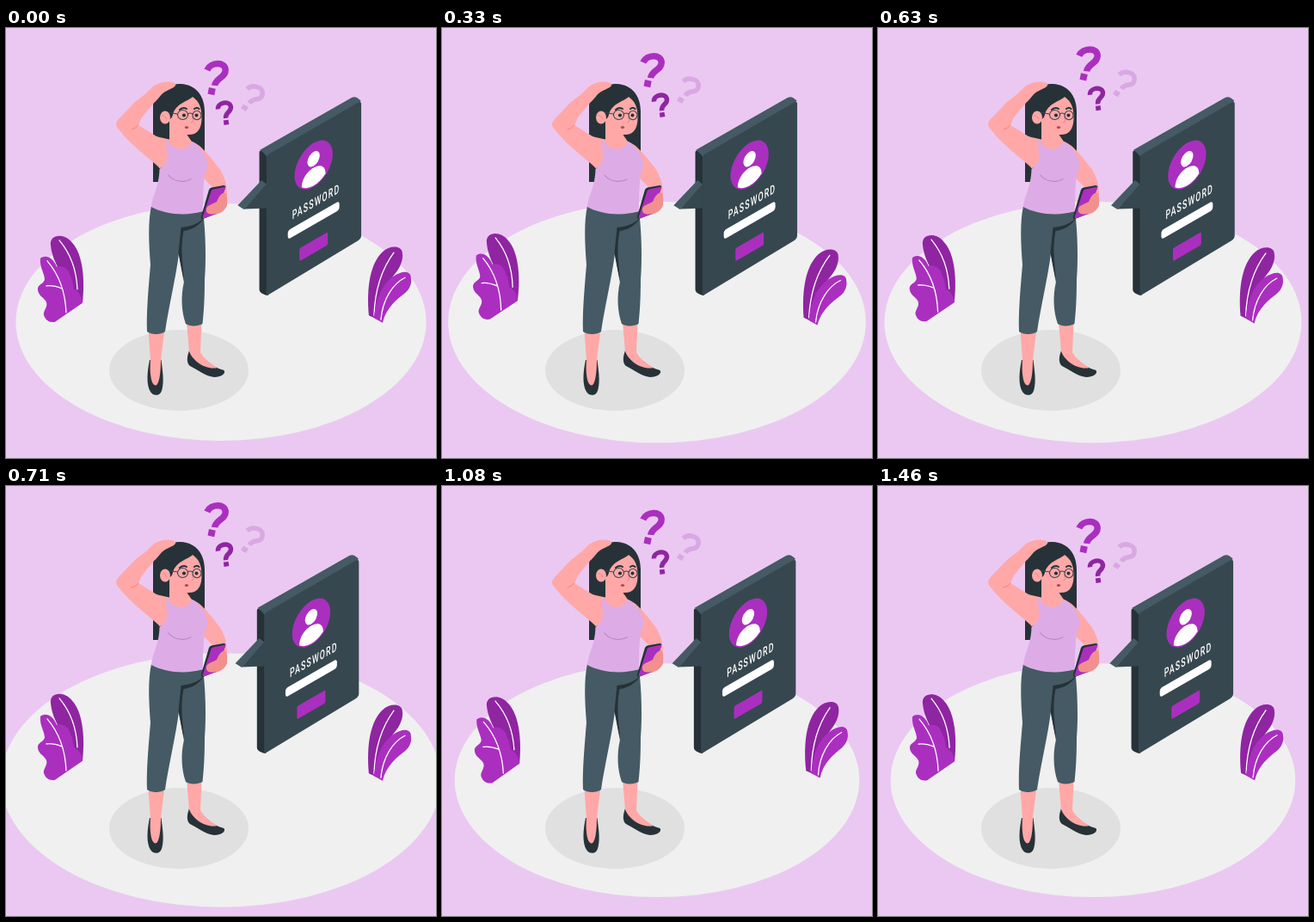
Recreate the animation shown at these times as an HTML page. Size 500 by 500 pixels, loop 1500 ms.

```html
<!DOCTYPE html>
<html lang="en">
<head>
<meta charset="utf-8">
<title>Forgot password</title>
<style>
  html, body { margin: 0; width: 100%; height: 100%; overflow: hidden; background: #ebc8f2; }
  svg { display: block; width: 100vw; height: 100vh; }
  .skin { fill: #ffa8a7; }
  .shade { fill: #f28f8f; }
  .ink { fill: #263238; }
  .slate { fill: #37474f; }
  .steel { fill: #455a64; }
  .purple { fill: #aa2fbf; }
  .plum { fill: #8f25a1; }
  .top { fill: #ddace6; }
  .white { fill: #fff; }
  .line { fill: none; stroke: #37474f; stroke-width: 1.1; stroke-linecap: round; }
  .vein { fill: none; stroke: #fff; stroke-width: 1.3; stroke-linecap: round; }
  .crease { fill: none; stroke: #ef8585; stroke-width: 1; stroke-linecap: round; }
  .hook { fill: none; }
  text { font: 500 14.5px Roboto, "Open Sans", sans-serif; letter-spacing: 1.8px; fill: #fff; }
</style>
</head>
<body>
<svg viewBox="0 0 500 500">
  <ellipse id="floor" cx="250" cy="342" rx="235.3" ry="136" fill="#f0f0f0"/>
  <ellipse cx="201" cy="398" rx="81" ry="47" fill="#e0e0e0"/>

  <g id="plants">
    <path class="plum" d="M52 253C50 240 68 238 77 250C90 264 92 295 89 320L74 312C70 290 54 275 52 253Z"/>
    <path class="vein" d="M62 247C73 260 82 280 83 304"/>
    <path class="purple" d="M40 268C46 263 55 267 59 278C66 276 73 280 75 289C78 294 78 299 79 304C85 307 88 312 89 320L57 342C50 343 46 340 44 334C43 329 49 325 47 319C44 313 38 312 37 305C36 298 45 298 45 292C44 284 39 278 40 268Z"/>
    <path class="vein" d="M48 271C60 285 69 305 70 331M47 300C54 299 60 301 65 303"/>

    <path class="plum" d="M461 262C461 252 446 252 438 260C424 273 419 300 422 334L433 339C436 310 444 296 452 286C458 279 462 270 461 262Z"/>
    <path class="vein" d="M451 261C437 280 429 305 428 334"/>
    <path class="purple" d="M471 291C471 281 460 282 450 289C438 297 430 315 428 337L438 342.500C442 325 455 315 464 308C470 303 472 296 471 291Z"/>
    <path class="vein" d="M464 290C450 297 438 315 436 339"/>
  </g>

  <g id="panel">
    <path class="ink" d="M294.700 145Q294.700 141.500 298 143L305 148V311Q302 311 298.500 309Q294.700 307 294.700 304Z"/>
    <path class="steel" d="M295.500 141.800L402 81Q405.500 79.500 409 81.500L412.800 84.500L408 91L304 151Q303 148 295.500 141.800Z"/>
    <path class="slate" d="M303 152Q303 148.500 306 146.500L409 87Q413.200 84.500 413.200 88V241Q413.200 245 409.500 247.200L306 309.700Q303 311.400 303 308Z"/>
    <path class="slate" d="M277 210.500L302 181L304 182V209.500Z"/>
    <path class="steel" d="M269.500 206.300L297.300 177L303 181.500L277 211Z"/>
    <g transform="matrix(.866 -.5 0 1 357.800 159.200)">
      <circle class="purple" r="25.600"/>
      <circle class="white" cy="-7" r="8.300"/>
      <path class="white" d="M-16 18C-16 -1.500 16 -1.500 16 18A24 24 0 0 1 -16 18Z"/>
      <rect x="-34.600" y="59" width="69.200" height="10.500" rx="3.500" fill="#fff"/>
      <rect class="purple" x="-19" y="87.500" width="38" height="15" rx="2"/>
    </g>
    <text transform="matrix(.61 -.352 0 1 333 222.700)">PASSWORD</text>
  </g>

  <g id="woman">
    <path class="ink" d="M171 92C171 75 187 65 203 65C222 66 231 80 231 97V158H181V179H171Z"/>

    <!-- feet -->
    <path class="ink" d="M167 386C164 400 163 415 168 423C172 429 180 428 181.500 420C184 410 182 398 180.500 386Z"/>
    <path class="skin" d="M165.500 352L168 386C167 398 168 414 173.500 415.500C178 416 180 402 180 386L184.500 350Z"/>
    <path class="ink" d="M213 375C210 383 210 390 214 393C224 398 232 405 242 406C250 406 256 402 253.500 398C245 396 238 391 230 384Z"/>
    <path class="skin" d="M210 342L213 376C217 387 232 398 246 395C239 391 231 386 226 377L227.500 342Z"/>

    <!-- trousers -->
    <path class="steel" d="M169 207C186 216 212 217 229 213C232 235 233 270 231 292C231 315 230 330 228.500 344C223 347 214 347.500 209 344C204 330 203 312 207 295L201 262C198 288 189 325 185 353C180 357 169 357 164 353C163 330 166 300 168 275C166 250 165 225 169 207Z"/>
    <path class="ink" d="M203.500 232L200.500 262L207 296C206 275 202 258 206.500 236C216 235 226 229 230 221C222 229 212 231 203.500 232Z"/>

    <!-- lowered arm and phone -->
    <path class="skin" d="M210 131C224 131 235 147 247 162C255 173 258 183 257 206C254 214 246 218 238 217L236 210C240 198 241 192 241 186C235 180 231 176 228 172Z"/>
    <path class="ink" d="M236 188Q237 186 239 185.500L253 183Q256 183 255 186L244 216L229 222Q226 222 227 219Z"/>
    <path class="purple" d="M238.500 189.500Q239 188 241 187.500L255.500 184.500L245 216L230 221.500Q228 221 229 219Z"/>
    <path class="shade" d="M233 212C232 206 240 205 245 202C248 194 253 190 256 192Q258 199 257 206C254 214 245 218 236 216Q233 215 233 212Z"/>

    <!-- neck and top -->
    <path class="skin" d="M190 108H209V122L216 132L210 146H190L183 134L190 130Z"/>
    <path class="skin" d="M192 130L174 126L178 163L190 158Z"/>
    <path class="top" d="M182 133L188 130.500C193 143 211 145 216 132C222 135 229 142 232 150C236 158 234 165 231 170C229 185 229 200 229 213C210 219 185 217 169 208C170 195 178 185 178.500 164C183 160 188 156 187 149C186 143 183 140 182 133Z"/>
    <path d="M189 171C195 179 207 180 215 176" fill="none" stroke="#b987c6" stroke-width="1.200" stroke-linecap="round"/>

    <!-- head -->
    <path class="skin" d="M189 98C190 82 204 76 216 79C225 84 228 94 227.500 106C227 118 222 124 213 124C204 125 195 120 190 111Z"/>
    <path class="ink" d="M187 101C183 85 190 70 205 69C221 70 230 83 230 98L228 98C227 91 224 85 217 80C212 85 199 87 194.500 99Q193 106 190 106Z"/>
    <ellipse class="skin" cx="185" cy="104" rx="6" ry="7.500"/>
    <path class="crease" d="M182 102Q185 101 187 106M216.500 104Q220 109 215.500 110"/>
    <path class="line" style="stroke:#263238;stroke-width:2" d="M202 95Q206 91.500 210 94M219 94Q222 91.500 224.500 94"/>
    <g class="line">
      <ellipse cx="205.500" cy="101" rx="6" ry="5.500"/>
      <ellipse cx="222" cy="101.500" rx="5" ry="5.200"/>
      <path d="M211.500 100Q214 98 217 100M199.500 100L190 98.500"/>
    </g>
    <circle class="ink" cx="207" cy="101.500" r="2.100"/>
    <circle class="ink" cx="221.500" cy="101.500" r="2"/>
    <ellipse cx="210" cy="115.500" rx="2.200" ry="1.500" fill="#b24a52"/>

    <!-- raised arm -->
    <path class="skin" d="M128 112Q128 109 131 106L150 86L163 76L171 68C178 63 188 61 196 64Q199 66 195 69L185 74C180 77 178 82 172 87L158 104L154 113L175 126L186 131L187 150C186 157 183 161 179 163C165 150 145 136 132 119Q128 115 128 112Z"/>
    <path class="crease" d="M154 113Q151 117 146 118"/>
  </g>

  <g id="marks">
    <g stroke="#aa2fbf" fill="#aa2fbf">
      <path class="hook" stroke-width="7.500" d="M233.800 49C238 39.500 255 38.800 255.200 49C255.500 57.500 243.500 58.500 242.700 67"/>
      <path stroke="none" d="M236 69L243.800 70.700L242.200 78.200L234.500 76.500Z"/>
    </g>
    <g stroke="#8f25a1" fill="#8f25a1">
      <path class="hook" stroke-width="5.400" d="M246.500 94.500C245.500 86.500 260 84 261.500 91.500C262.500 98 254.500 97.500 255.600 105"/>
      <path stroke="none" d="M252.800 107.600L258.500 106.800L259.400 112L253.600 113Z"/>
    </g>
    <g stroke="#d9a8e3" fill="#d9a8e3">
      <path class="hook" stroke-width="5.600" d="M280.500 71C286 65.500 300 68 298 77.500C296 86 288 79.500 283 87.500"/>
      <path stroke="none" d="M276 88.500L282 92L279 97L273 93.500Z"/>
    </g>
  </g>
</svg>
<script>
  const LOOP = 1500, STEPS = 36;

  // Each track is a list of [progress, value], joined linearly.
  const tracks = {
    pulse: [[0, 1], [.1, 1.1], [.3, 1], [.4, 1], [.5, 1.1], [.6, 1], [1, 1]],
    lift: [[0, .5], [.5, -19.5], [1, .5]],
    sway: [[0, 0], [.25, 1], [.75, -1], [1, 0]],
    shake: [[0, 0], [.1, -1], [.2, 2], [.3, -4], [.4, 4], [.5, -4],
            [.6, 4], [.7, -4], [.8, 2], [.9, -1], [1, 0]]
  };

  function valueAt(track, p) {
    const i = track.findIndex(([stop]) => stop >= p);
    if (i < 1) return track[0][1];
    const [p0, v0] = track[i - 1], [p1, v1] = track[i];
    return v0 + (v1 - v0) * (p - p0) / (p1 - p0);
  }

  const place = (id, transform) =>
    document.getElementById(id).setAttribute('transform', transform);

  function draw(ms) {
    // 24 poses a second, each taken at the middle of its slot
    const step = Math.floor((ms + 4) * STEPS / LOOP) % STEPS;
    const p = (step + .5) / STEPS;
    const at = name => valueAt(tracks[name], p);
    place('floor', `translate(250 342) scale(${at('pulse')}) translate(-250 -342)`);
    place('marks', `translate(0 ${at('lift')})`);
    place('plants', `rotate(${at('sway')} 250 250)`);
    place('panel', `translate(${at('shake')} 0)`);
  }

  const start = performance.now();
  function tick() {
    draw(performance.now() - start);
    requestAnimationFrame(tick);
  }
  tick();
</script>
</body>
</html>
```
